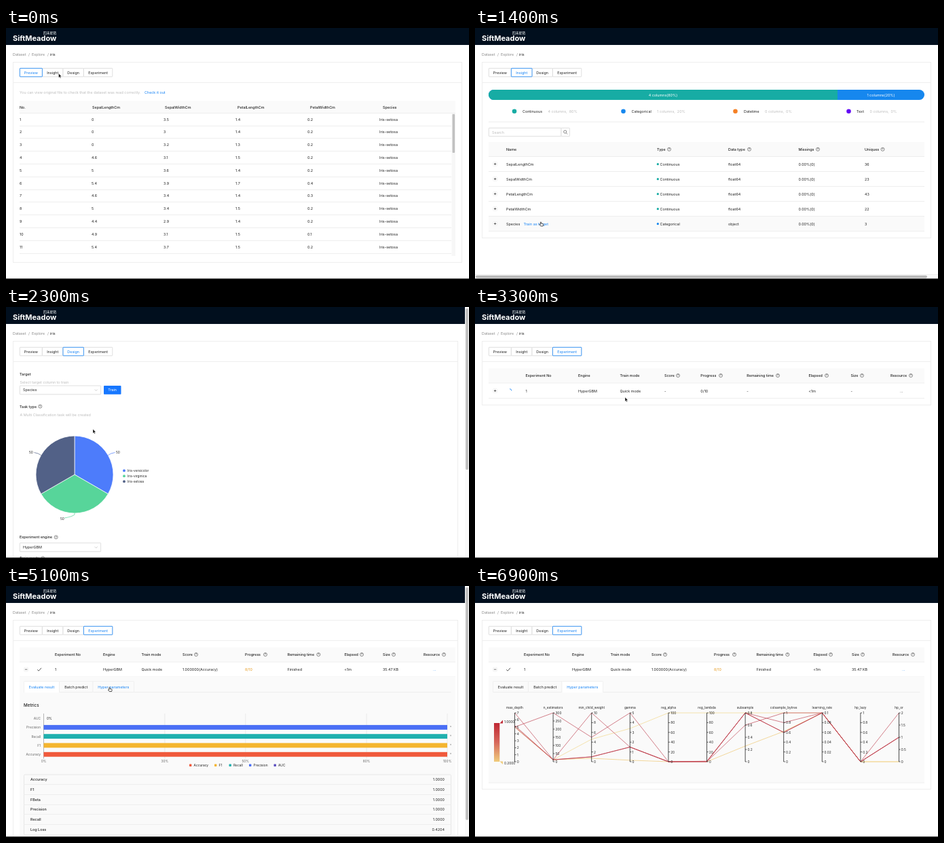
Write an HTML page that moves like this. It is 682 px wide and 370 px high and loops after 7.1 s.

```html
<!DOCTYPE html>
<html lang="en">
<head>
<meta charset="utf-8">
<title>Dataset explorer</title>
<style>
html, body { margin: 0; width: 100%; height: 100%; overflow: hidden; background: #fff; }
svg { display: block; width: 682px; height: 370px; }
text { font: 5.4px Inter, "Noto Sans CJK SC", sans-serif; fill: #222; white-space: pre; }
.m { font-weight: 500; }
.g { fill: #bdbdbd; }
.d { fill: #8a8a8a; }
.b, .hover { fill: #1683f5; }
.w { fill: #fff; }
.o { fill: #e59a1f; }
.c { text-anchor: middle; }
.e { text-anchor: end; }
.s { font-size: 4.8px; }
.a { fill: #666; }
.h { font-size: 6.25px; font-weight: 500; }
.q { font-size: 3.8px; text-anchor: middle; }
.logo { font-size: 11px; font-weight: 700; }
</style>
</head>
<body>
<svg id="stage" viewBox="0 0 682 370" xmlns="http://www.w3.org/2000/svg"></svg>
<script>
const LOOP = 7100, STEP = 100;
const LINE = '#eeeeee', EDGE = '#d9d9d9', SOFT = '#fafafa', BLUE = '#1683f5', THUMB = '#c1c1c1';
const $ = id => document.getElementById(id);

// Drawing helpers; text y is the middle of the capitals.
const text = (x, y, s, cls = '') => `<text x="${x}" y="${y + 2}" class="${cls}">${s}</text>`;
const rect = (x, y, w, h, fill, more = '') =>
  `<rect x="${x}" y="${y}" width="${w}" height="${h}" fill="${fill}" ${more}/>`;
const path = (d, stroke, w = 0.8, more = '') =>
  `<path d="${d}" fill="none" stroke="${stroke}" stroke-width="${w}" ${more}/>`;
const hline = (x1, x2, y, color = LINE) => path(`M${x1} ${y}H${x2}`, color, 1);
const box = (x, y, w, h, edge = EDGE, fill = '#fff', r = 0.5) =>
  rect(x, y, w, h, fill, `stroke="${edge}" stroke-width=".8" rx="${r}"`);
const dot = (x, y, r, fill) => `<circle cx="${x}" cy="${y}" r="${r}" fill="${fill}"/>`;
const help = (x, y) =>
  `<circle cx="${x}" cy="${y}" r="2.5" fill="none" stroke="#444" stroke-width=".6"/>` +
  `<text x="${x}" y="${y + 1.4}" class="q">?</text>`;
const each = (list, fn) => list.map(fn).join('');
const toggle = (y, open) => box(26.8, y - 2.8, 5.6, 5.6, LINE) +
  path(`M27.9 ${y}h3.4` + (open ? '' : `m-1.7 -1.7v3.4`), '#333', 0.7);
const select = (y, label) => box(20.4, y, 119.2, 12.8) + text(25, y + 6.3, label) +
  path(`M130.7 ${y + 5.5}l2 2l2 -2`, '#bbb', 0.7);

const TABS = [['Preview', 20.4, 53.4], ['Insight', 53.4, 84], ['Design', 84, 114.4], ['Experiment', 114.4, 156.8]];

function frame(active, bottom, narrow, body) {
  const right = narrow ? 676 : 682;
  const tab = ([label, x1, x2], edge, cls) =>
    box(x1, 59.4, x2 - x1, 12.4, edge, '#fff') + text((x1 + x2) / 2, 65.5, label, 'c ' + cls);
  return rect(0, 0, 682, 370, '#fff') + rect(0, 0, right, 25, '#010f1e') +
    text(10, 17, 'SiftMeadow', 'logo w') + text(55, 6.8, '四禾星陌', 's w m') +
    text(10, 39, 'Dataset', 'd') + text(33, 39, '/', 'd') + text(38, 39, 'Explore', 'd') +
    text(61, 39, '/', 'd') + text(65, 39, 'iris') +
    rect(10.5, 50.5, right - 21, bottom - 50, 'none', `stroke="${LINE}"`) +
    hline(10.5, right - 10.5, 80.5) +
    each(TABS, t => tab(t, EDGE, '')) + tab(TABS[active], BLUE, 'b') + body;
}

const vScroll = len => rect(676, 0, 6, 370, SOFT) + rect(677, 2, 4, len, THUMB, 'rx="2"');

function preview() {
  const heads = ['No.', 'SepalLengthCm', 'SepalWidthCm', 'PetalLengthCm', 'PetalWidthCm', 'Species'];
  const rows = ['0 3.5 1.4 0.2', '0 3 1.4 0.2', '0 3.2 1.3 0.2', '4.6 3.1 1.5 0.2', '5 3.6 1.4 0.2',
    '5.4 3.9 1.7 0.4', '4.6 3.4 1.4 0.3', '5 3.4 1.5 0.2', '4.4 2.9 1.4 0.2', '4.9 3.1 1.5 0.1', '5.4 3.7 1.5 0.2'];
  return text(20, 94.5, 'You can view original file to check that the dataset was read correctly.', 'g') +
    text(204, 94.5, 'Check it out', 'b') + rect(20, 107.5, 642, 18, SOFT) + hline(20, 662, 125.5) +
    each(heads, (h, i) => text(20 + 107 * i, 116.5, h, 'm')) +
    each(rows, (r, i) => {
      const y = 134.5 + 18.8 * i;
      return each([i + 1, ...r.split(' '), 'Iris-setosa'], (v, k) => text(20 + 106 * k, y, v)) +
        hline(20, 656, Math.round(y + 9) + 0.5);
    }) +
    rect(656.5, 126, 5.5, 210, '#f7f7f7') + rect(657.5, 127, 3.6, 57, THUMB, 'rx="1"');
}

function insight() {
  const kinds = [['Continuous', 58, 70, 107.5, '4 columns,  80%', '#17aca4'], ['Categorical', 218.5, 230.5, 268, '1 columns,  20%', '#1687ee'],
    ['Datetime', 383.5, 396, 427, '0 columns,  0%', '#f58025'], ['Text', 550.5, 562, 581.5, '0 columns,  0%', '#6208f5']];
  const heads = [['Type', 268, 286], ['Data type', 373, 404], ['Missings', 476.5, 505], ['Uniques', 574, 600.5]];
  const cols = [['SepalLengthCm', 36], ['SepalWidthCm', 23], ['PetalLengthCm', 43], ['PetalWidthCm', 22], ['Species', 3]];
  return rect(20, 91, 642, 15, '#1687ee', 'rx="7.5"') +
    `<path d="M27.5 91H534V106H27.5A7.5 7.5 0 0 1 27.5 91Z" fill="#17aca4"/>` +
    text(277, 98.5, '4 columns(80%)', 'c w') + text(598, 98.5, '1 columns(20%)', 'c w') +
    each(kinds, ([name, x, tx, gx, info, color]) =>
      dot(x, 122.7, 3.3, color) + text(tx, 122.5, name) + text(gx, 122.5, info, 'g')) +
    hline(20, 662, 138.5) +
    box(20.4, 147.4, 106.6, 12.2) + text(25, 153.5, 'Search', 'g') + box(127, 147.4, 12.4, 12.2) +
    path('M134.3 154.8l1.8 1.8M134.8 153a2.1 2.1 0 1 1 -4.2 0a2.1 2.1 0 1 1 4.2 0', '#555', 0.7) +
    rect(20, 168, 642, 22, SOFT) + hline(20, 662, 189.5) + text(46, 178.8, 'Name', 'm') +
    each(heads, ([h, x, q]) => text(x, 178.8, h, 'm') + help(q, 178.8)) +
    each(cols, ([name, uniq], i) => {
      const y = 200.5 + 22 * i, last = i === 4;
      return rect(20, y - 10.5, 642, 21, SOFT, `class="row" visibility="hidden"`) + toggle(y, false) +
        text(46, y, `${name}<tspan class="b link" dx="5.5" visibility="hidden">Train as target</tspan>`) +
        dot(269.3, y + 0.2, 1.6, last ? '#1687ee' : '#17aca4') + text(272.5, y, last ? 'Categorical' : 'Continuous') +
        text(373, y, last ? 'object' : 'float64') + text(476.5, y, '0.00%(0)') + text(574, y, uniq) +
        hline(20, 662, y + 11);
    }) +
    rect(0, 363, 682, 7, SOFT) + hline(0, 682, 363.5) + rect(1, 364.7, 665, 3.8, '#b9b9b9', 'rx="1.9"');
}

function design() {
  const cx = 101, cy = 247, r = 57;
  const at = deg => {
    const a = (deg - 90) * Math.PI / 180;
    return `${cx + r * Math.cos(a)} ${cy + r * Math.sin(a)}`;
  };
  const parts = [['Iris-versicolor', '#4d7cfb', 'M150.4 218.5Q154 215.5 160.5 214.5'],
    ['Iris-virginica', '#57d59a', 'M101 304V306Q98 309 86 311'],
    ['Iris-setosa', '#526187', 'M51.6 218.5Q48 215.5 41.5 214.5']];
  return text(20, 98.5, 'Target', 'm') + text(20.5, 111.3, 'Select target column to train', 'g') +
    select(116, 'Species') + rect(144, 116, 25.5, 12.8, '#1677ff', 'rx=".8"') + text(156.7, 122.3, 'Train', 'c w') +
    text(20, 146.5, 'Task type', 'm') + help(50.3, 146.5) +
    text(20.5, 159, 'A Multi Classification task will be created', 'g') +
    each(parts, ([name, color, lead], i) =>
      `<path d="M${cx} ${cy}L${at(120 * i)}A${r} ${r} 0 0 1 ${at(120 * i + 120)}Z" fill="${color}" stroke="#fff" stroke-width=".7"/>` +
      path(lead, color, 0.7) + dot(174, 241.2 + 8 * i, 1.9, color) + text(179, 241 + 8 * i, name, 's')) +
    text(162, 214.3, '50', 's') + text(34, 214.3, '50', 's') + text(80, 311.8, '50', 's') +
    text(20, 339.3, 'Experiment engine', 'm') + help(73.7, 339.3) + select(347.8, 'HyperGBM') +
    text(20, 370.3, 'Train mode', 'm') + help(54.3, 370.3) + vScroll(238);
}

const HEADS = ['Experiment No', 'Engine', 'Train mode', 'Score', 'Progress', 'Remaining time', 'Elapsed', 'Size', 'Resource'];

function table(xs, marks, y, cells, styles = {}) {
  return rect(20, 90.5, 642, 21.5, SOFT) + hline(20, 662, 112) +
    each(HEADS, (h, i) => text(xs[i], 101, h, 'm')) + each(marks, x => help(x, 101)) +
    each(cells, (v, i) => text(xs[i] + (i === 8 ? 14 : 0), y, v, styles[i] || '')) + hline(20, 662, y + 11);
}

const running = () => table([74.5, 152, 213.5, 279, 332.3, 400.3, 491.5, 553.5, 612],
  [299, 362, 446, 518, 570, 642], 123.5,
  ['1', 'HyperGBM', 'Quick mode', '-', '0/10', '-', '&lt;1m', '-', '...']) + toggle(123.5, false) +
  `<g id="spin">${path('M51 120.7A2.8 2.8 0 0 1 53.8 123.5', BLUE, 0.8)}</g>`;

const done = open => table([72, 143, 199.5, 260, 352, 414.5, 498.5, 555, 615],
  [280, 382, 460.3, 524, 571, 645], 123,
  ['1', 'HyperGBM', 'Quick mode', '1.000000(Accuracy)', '8/10', 'Finished', '&lt;1m', '35.47 KB', '...'],
  { 4: 'o', 8: 'b' }) + toggle(123, open) + path('M46.2 123.2l2 2l3.8 -4.4', '#333', 0.8);

const SUBTABS = [['Evaluate result', 26.5, 78.5], ['Batch predict', 78.5, 128], ['Hyper parameters', 128, 188.5]];

const panel = (active, bottom) => rect(20, 134, 642, bottom - 134, SOFT) + hline(26, 655.5, 156.5) +
  each(SUBTABS, ([label, x1, x2], i) => {
    const on = i === active;
    return box(x1, 140.5, x2 - x1, 16, LINE, on ? '#fff' : SOFT) +
      (on ? hline(x1 + 0.4, x2 - 0.4, 156.5, '#fff') : '') +
      text((x1 + x2) / 2, 148.5, label, `c subtab sub${i} ${on ? 'b' : ''}`);
  });

function evaluate() {
  const series = [['AUC', '#5b4fbf', 394.5], ['Precision', '#4a6ff5', 358], ['Recall', '#1fb0ae', 328.5],
    ['F1', '#f4b52f', 307], ['Accuracy', '#f05a3c', 270]];
  const scores = ['Accuracy', 'F1', 'FBeta', 'Precision', 'Recall', 'Log Loss'];
  const px = p => 55.5 + 5.945 * p;
  return done(true) + panel(0, 370) + text(26, 176, 'Metrics', 'h') +
    each([0, 30, 50, 80, 100], p => path(`M${px(p)} 188V254.5`, p ? '#e2e2e2' : '#999', 0.7) +
      text(px(p), 257.5, p + '%', 'c s a')) +
    text(60, 195, '0%', 's') +
    each(series, ([name, color, x], i) => {
      const y = 195 + 13.3 * i;
      return text(51, y, name, 'e s a') + rect(x, 262.5, 3.4, 3.4, color, 'rx=".6"') + text(x + 6.6, 264, name, 's') +
        (i ? rect(55.5, y - 3.4, 0, 6.9, color, 'class="bar"') + rect(654.6, y - 2, 0.8, 1.6, '#555') : '');
    }) +
    box(26.5, 278, 629, 89, '#e3e3e3', SOFT, 1.5) +
    each(scores, (name, i) => {
      const y = 284.8 + 14.85 * i;
      return text(36, y, name, 'm') + text(646, y, i === 5 ? '0.4204' : '1.0000', 'e') +
        (i < 5 ? hline(26.5, 655.5, Math.round(y + 7) + 0.5) : '');
    }) + vScroll(343);
}

function hyper() {
  const axes = [['max_depth', 7, 1], ['n_estimators', 300, 50], ['min_child_weight', 10, 2], ['gamma', 5, 1],
    ['reg_alpha', 100, 20], ['reg_lambda', 100, 20], ['subsample', 0.8, 0.2], ['colsample_bytree', 1, 0.2],
    ['learning_rate', 0.1, 0.02], ['hp_lazy', 1, 0.2], ['hp_or', 2, 0.5]];
  // Heights along the axes, 0 to 1.
  const runs = [
    ['#f3dc9a', [.71, .04, .46, .68, 1, 1, 1, 1, 1, 0, 0]],
    ['#f0cf85', [.71, .04, .07, .03, 0, 0, .32, .62, 1, 0, 0]],
    ['#c8606c', [.71, 1, .5, 1, 0, 0, 1, .6, 1, 0, .5]],
    ['#c8606c', [1, .04, 1, .3, 0, 0, 1, .8, 1, 0, .5]],
    ['#c8606c', [.71, .04, .1, .3, 0, 0, .75, 1, 1, 0, 1]],
    ['#bf3a48', [.74, .04, .1, .3, 0, .01, 1, .6, 1, 0, .5]]];
  const px = i => 58.5 + 56.6 * i, py = f => 259 - 72 * f;
  return done(true) + panel(2, 290) + hline(20, 662, 290) +
    '<defs><linearGradient id="heat" x1="0" y1="0" x2="0" y2="1"><stop offset="0" stop-color="#bf2733"/>' +
    '<stop offset=".5" stop-color="#d6685c"/><stop offset="1" stop-color="#f0cc7c"/></linearGradient>' +
    '<clipPath id="wipe"><rect id="wipeBox" x="57" y="180" width="0" height="85"/></clipPath></defs>' +
    rect(28, 202, 8.3, 57, 'url(#heat)') +
    '<path d="M36.5 202.5L41 197.5V202.5Z" fill="#bf2733"/><path d="M36.5 258.5L41 263V258.5Z" fill="#f0cc7c"/>' +
    text(43, 200, '1.0000', 's') + text(43, 260.5, '0.2000', 's') +
    '<g clip-path="url(#wipe)">' + each(runs, ([color, fs]) =>
      path('M' + fs.map((f, i) => `${px(i)} ${py(f)}`).join('L'), color, 0.8)) + '</g>' +
    each(axes, ([name, max, step], i) => {
      const n = Math.round(max / step), x = px(i);
      return text(x, 178.5, name, 'c s') + path(`M${x} 187V259`, '#222', 0.8) +
        each([...Array(n + 1).keys()], k => path(`M${x} ${py(k / n)}h2.2`, '#222', 0.7) +
          text(x + 3.3, py(k / n), +(k * step).toFixed(2), 's'));
    });
}

const SCENES = [
  [0, frame(0, 345, false, preview())],
  [300, frame(1, 309, false, insight())],
  [1700, frame(2, 390, true, design())],
  [3300, frame(3, 144, false, running())],
  [3800, frame(3, 144, false, done(false))],
  [4300, frame(3, 390, true, evaluate())],
  [5700, frame(3, 299, false, hyper())]];

// Pointer: time, x, y, is a hand
const POINTER = [
  [0, 77.5, 67, 0], [300, 77.5, 67, 1], [500, 77.5, 67, 0], [1200, 97, 286, 1], [1700, 97, 286, 0],
  [2100, 128, 180, 0], [2500, 128, 180, 0], [2900, 156, 122, 1], [3200, 156, 122, 1], [3300, 221, 133, 0],
  [3700, 221, 133, 0], [4100, 30, 122, 1], [4400, 30, 122, 0], [5000, 152.5, 149.5, 1], [5700, 152.5, 149.5, 1],
  [6000, 113, 148, 1], [6300, 113, 148, 1], [6700, 113, 385, 0], [LOOP, 113, 385, 0]];

$('stage').innerHTML = each(SCENES, ([, html]) => `<g class="scene">${html}</g>`) +
  rect(0, 369.2, 682, 0.8, '#333') +
  '<g id="pointer"><path id="arrow" d="M0 0V6.2L1.4 4.9L2.4 7.1L3.4 6.7L2.4 4.5H4.4Z" fill="#111" stroke="#fff" stroke-width=".4"/>' +
  '<path id="hand" d="M-.7 .3Q0 -.6 .6 .3V2.2L3.2 2.7Q3.8 2.9 3.7 3.7L3.1 6H-.2L-2.1 3.6Q-2 2.8 -.7 3.6Z" fill="#fff" stroke="#111" stroke-width=".7"/></g>';

const all = q => [...document.querySelectorAll(q)];
const scenes = all('.scene'), rows = all('.row'), links = all('.link'), bars = all('.bar'), subtabs = all('.subtab');
const easeOut = p => 1 - (1 - Math.min(1, Math.max(0, p))) ** 3;

function pointerAt(t) {
  const i = POINTER.findIndex(k => k[0] > t) - 1;
  const [t0, x0, y0, hand] = POINTER[i], [t1, x1, y1] = POINTER[i + 1];
  const p = (t - t0) / (t1 - t0), e = p * p * (3 - 2 * p);
  return [x0 + (x1 - x0) * e, y0 + (y1 - y0) * e, hand];
}

function draw() {
  const t = Math.floor(performance.now() % LOOP / STEP) * STEP;
  const now = SCENES.filter(s => s[0] <= t).length - 1;
  scenes.forEach((g, i) => { g.style.display = i === now ? '' : 'none'; });

  const [x, y, hand] = pointerAt(t);
  $('pointer').setAttribute('transform', `translate(${x} ${y})`);
  $('arrow').style.display = hand ? 'none' : '';
  $('hand').style.display = hand ? '' : 'none';

  const over = Math.floor((y - 189.5) / 22);
  rows.forEach((r, i) => {
    const show = i === over ? 'visible' : 'hidden';
    r.setAttribute('visibility', show);
    links[i].setAttribute('visibility', show);
  });
  const sub = y > 140 && y < 157 ? SUBTABS.findIndex(s => x >= s[1] && x < s[2]) : -1;
  subtabs.forEach(el => el.classList.toggle('hover', el.classList.contains('sub' + sub)));

  $('spin').setAttribute('transform', `rotate(${(t - 3300) * 0.3} 51 123.5)`);
  bars.forEach(b => b.setAttribute('width', 594.5 * easeOut((t - 4300) / 700)));
  $('wipeBox').setAttribute('width', 568 * easeOut((t - 5700) / 1050));
  requestAnimationFrame(draw);
}
draw();
</script>
</body>
</html>
```
